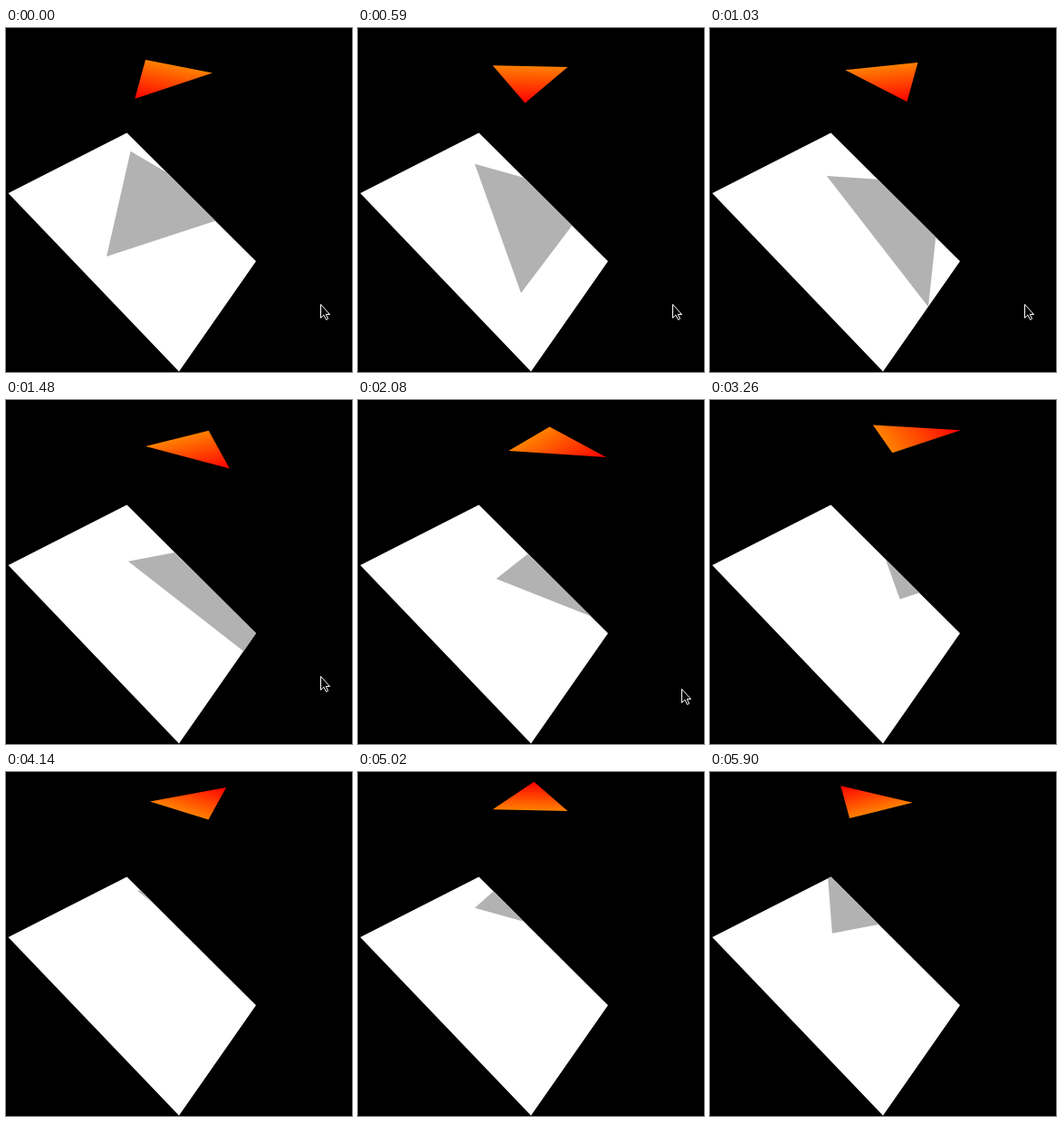
Write an HTML page with a canvas that moves like this. It is 382x379 px and loops after 6000 ms.

```html
<!DOCTYPE html>
<html>
<head>
<meta charset="utf-8">
<style>
html, body { margin: 0; width: 100%; height: 100%; overflow: hidden; background: #000; }
canvas { display: block; }
</style>
</head>
<body>
<canvas width="382" height="379"></canvas>
<script>
const ctx = document.querySelector('canvas').getContext('2d');
const LOOP = 6000, STEP = 147.7, LAST = 40;
const REACH = 2.24; // tip distance relative to half the base

const floor = [[2.5, 182], [133.5, 115.5], [276, 257], [191, 378.5]];
const arrow = [[.5, .5], [.5, 15.5], [4, 12.3], [6.5, 17.5], [8.5, 16.5], [6.3, 11.5], [10.5, 11.5]];

// Cursor stops: step, x, y
const stops = [[11, 347, 304], [14, 357, 318], [16, 363, 325], [17, 365, 335], [19, 367, 368], [20, 368, 385]];

// Perspective views of the spinning plane: centre, x and y weights, depth weights
const solidView = { x: 190, y: 42.1, a: 41.5, b: 0, d: 0, e: 15.85, k: 0, m: .058 };
const shadowView = { x: 190.8, y: 167, a: 65.5, b: -.3, d: 16, e: 43.9, k: .051, m: .105 };

function project(v, degrees, radius) {
  const t = degrees * Math.PI / 180;
  const c = radius * Math.cos(t), s = radius * Math.sin(t);
  const w = 1 - v.k * c - v.m * s;
  return [v.x + (v.a * c + v.b * s) / w, v.y + (v.d * c + v.e * s) / w];
}

const triangle = (view, turn) => [
  project(view, turn, REACH),
  project(view, turn + 90, 1),
  project(view, turn - 90, 1)
];

function trace(points) {
  ctx.beginPath();
  for (const p of points) ctx.lineTo(...p);
  ctx.closePath();
}

function fill(points, style) {
  trace(points);
  ctx.fillStyle = style;
  ctx.fill();
}

// Orange along the base, red at the tip
function shade([tip, p, q]) {
  const dx = q[0] - p[0], dy = q[1] - p[1];
  const f = ((tip[0] - p[0]) * dx + (tip[1] - p[1]) * dy) / (dx * dx + dy * dy);
  const g = ctx.createLinearGradient(p[0] + f * dx, p[1] + f * dy, ...tip);
  g.addColorStop(0, '#ff8000');
  g.addColorStop(1, '#ff0000');
  return g;
}

function cursorAt(n) {
  if (n <= stops[0][0]) return stops[0].slice(1);
  const i = stops.findIndex(s => s[0] >= n);
  if (i < 0) return null;
  const [n0, x0, y0] = stops[i - 1], [n1, x1, y1] = stops[i];
  const f = (n - n0) / (n1 - n0);
  return [Math.round(x0 + (x1 - x0) * f), Math.round(y0 + (y1 - y0) * f)];
}

function drawCursor(n) {
  const at = cursorAt(n);
  if (!at) return;
  ctx.save();
  ctx.translate(...at);
  trace(arrow);
  ctx.strokeStyle = '#fff';
  ctx.lineWidth = 1;
  ctx.stroke();
  ctx.restore();
}

function draw(now) {
  const n = Math.min(LAST, Math.floor((now % LOOP + 10) / STEP));
  const turn = 117 - 6 * n;

  ctx.fillStyle = '#000';
  ctx.fillRect(0, 0, 382, 379);

  fill(floor, '#fff');
  ctx.save();
  trace(floor);
  ctx.clip();
  fill(triangle(shadowView, turn), '#b2b2b2');
  ctx.restore();

  const solid = triangle(solidView, turn);
  fill(solid, shade(solid));
  drawCursor(n);
}

const start = performance.now();
function tick() {
  draw(performance.now() - start);
  requestAnimationFrame(tick);
}
tick();
</script>
</body>
</html>
```
